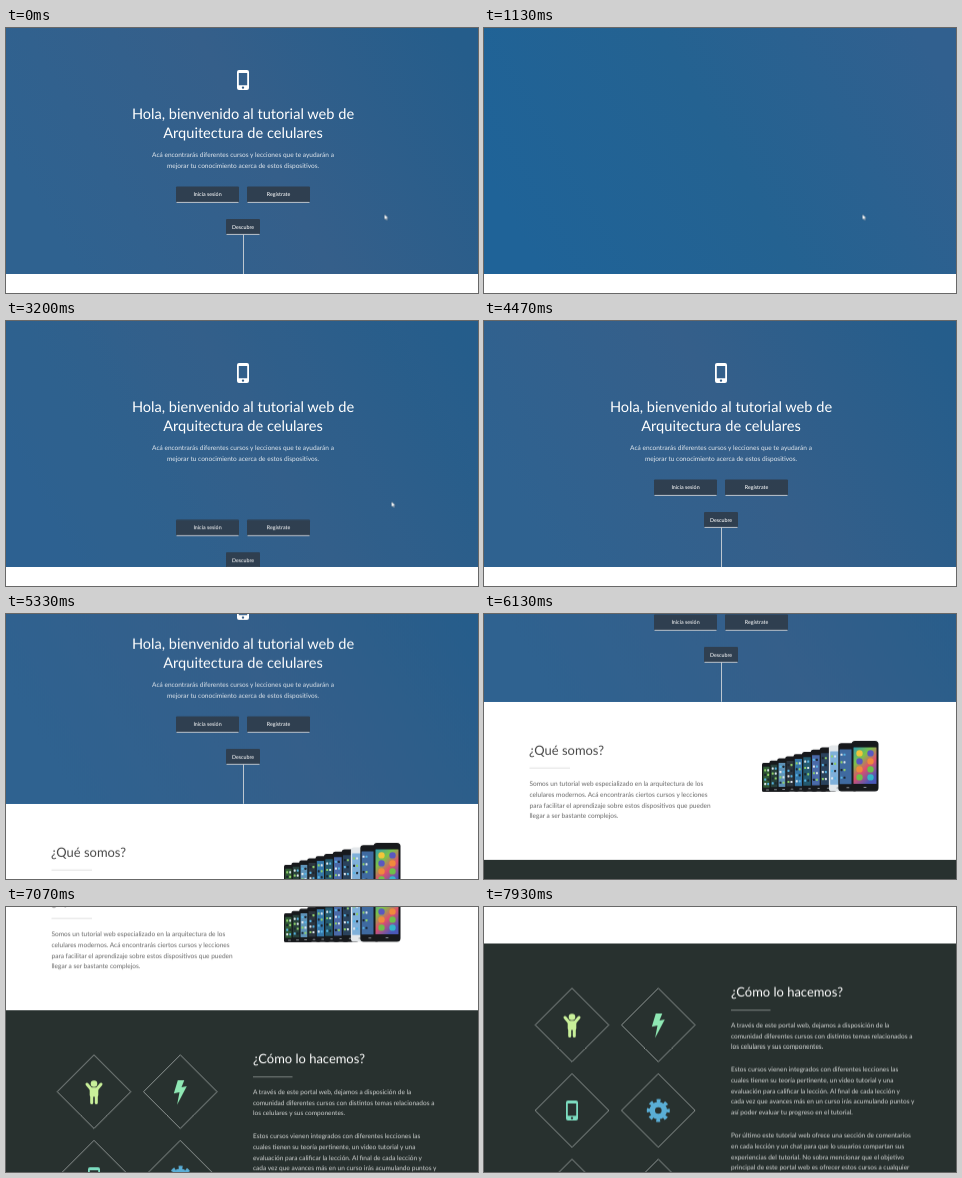
An HTML page that plays this animation: 472x265 px, repeating every 8000 ms.

```html
<!DOCTYPE html>
<html lang="es">
<head>
<meta charset="utf-8">
<title>Arquitectura de celulares</title>
<style>
html, body { margin: 0; width: 100%; height: 100%; overflow: hidden; background: #fff; }
svg { display: block; width: 472px; height: 265px; }
text { font: 6.52px Lato, "Open Sans", sans-serif; white-space: pre; text-rendering: geometricPrecision; }
.mid { text-anchor: middle; fill: #fff; }
.title { font-size: 14.6px; }
.head { font-size: 12.95px; }
.btn { font-size: 5.3px; font-weight: 500; }
.page, .intro, .slide, .shade, .pointer { animation: 8s linear infinite; }

.page { animation-name: scroll; }
@keyframes scroll {
  0%, 63.9% { transform: translateY(0); }
  66.625% { transform: translateY(-56px); }
  76.625% { transform: translateY(-158px); }
  88.375% { transform: translateY(-300.7px); }
  99.125%, 100% { transform: translateY(-367.5px); }
}
.intro { animation-name: intro; }
@keyframes intro {
  0%, 11.62% { opacity: 1; }
  11.63%, 20.875% { opacity: 0; }
  33%, 100% { opacity: 1; }
}
.slide { animation-name: slide; }
@keyframes slide {
  0%, 11.62% { opacity: 1; transform: translateY(0); }
  11.63%, 30% { opacity: 0; transform: translateY(90px); }
  40% { opacity: 1; transform: translateY(40.3px); animation-timing-function: ease-out; }
  53.75%, 100% { opacity: 1; transform: translateY(0); }
}
.shade { animation-name: shade; }
@keyframes shade {
  0%, 11.62% { opacity: 1; }
  11.63%, 20.875% { opacity: 0; animation-timing-function: ease; }
  50%, 100% { opacity: 1; }
}
.pointer { animation-name: pointer; }
@keyframes pointer {
  0%, 36.25% { transform: translate(378.5px, 186.5px); }
  40% { transform: translate(385.5px, 180.7px); animation-timing-function: ease-in-out; }
  57%, 100% { transform: translate(480px, 130px); }
}
</style>
</head>
<body>
<svg viewBox="0 0 472 265">
  <defs>
    <linearGradient id="sky" x1="0" y1="0.6" x2="1" y2="0.3">
      <stop offset="0" stop-color="#1f6398"/>
      <stop offset="0.5" stop-color="#246291"/>
      <stop offset="1" stop-color="#31608f"/>
    </linearGradient>
    <linearGradient id="dusk" x1="0" y1="0.5" x2="1" y2="0.2">
      <stop offset="0" stop-color="#2f6290"/>
      <stop offset="0.5" stop-color="#355f8a"/>
      <stop offset="1" stop-color="#255d8b"/>
    </linearGradient>
    <linearGradient id="rainbow" x1="0" y1="0" x2="0.6" y2="1">
      <stop offset="0" stop-color="#2f9bb0"/>
      <stop offset="0.35" stop-color="#7cc24a"/>
      <stop offset="0.65" stop-color="#e0506c"/>
      <stop offset="1" stop-color="#4a58b8"/>
    </linearGradient>
    <clipPath id="heroClip"><path d="M0 0H472V246H0Z"/></clipPath>
    <path id="mobile" fill-rule="evenodd" d="M-4-10H4Q6-10 6-8V8Q6 10 4 10H-4Q-6 10-6 8V-8Q-6-10-4-10ZM-4.2-7V5.2H4.2V-7ZM-1.2 7.6A1.2 1.2 0 1 0 1.2 7.6A1.2 1.2 0 1 0-1.2 7.6Z"/>
    <g id="child" stroke="#c9f09a" stroke-width="3" stroke-linecap="round" stroke-linejoin="round" fill="#c9f09a">
      <circle cy="-8" r="1.8"/>
      <path d="M-7-7.5L-2.8-2.5H2.8L7-7.5" fill="none"/>
      <path d="M-2.8-2.5H2.8V3.5H-2.8Z"/>
      <path d="M-2.3 3V11M2.3 3V11"/>
    </g>
    <path id="bolt" fill="#8fe8b4" d="M-2.5-11.5H4L1.2-4.5L6.5-5.6L-3.2 13L-.8.4L-6.5 1.8Z"/>
    <g id="cog" fill="none" stroke="#5aaed6">
      <circle r="6" stroke-width="5.4"/>
      <circle r="9.5" stroke-width="4" stroke-dasharray="3.73" stroke-dashoffset="1.87"/>
    </g>
    <use id="cell" href="#mobile" fill="#7cdcc0"/>
  </defs>

  <g class="page">
    <rect y="246" width="472" height="158" fill="#fff"/>
    <g clip-path="url(#heroClip)">
      <rect width="472" height="246" fill="url(#sky)"/>
      <rect class="shade" width="472" height="246" fill="url(#dusk)"/>
      <g class="intro">
        <use href="#mobile" x="237" y="52" fill="#fff"/>
        <text class="mid title"><tspan x="237" y="90.5">Hola, bienvenido al tutorial web de</tspan><tspan x="237" dy="19.7">Arquitectura de celulares</tspan></text>
        <text class="mid" fill-opacity="0.85"><tspan x="237" y="128.9">Acá encontrarás diferentes cursos y lecciones que te ayudarán a</tspan><tspan x="237" dy="10.6">mejorar tu conocimiento acerca de estos dispositivos.</tspan></text>
      </g>
      <g class="slide">
        <g fill="#2f3f50">
          <rect x="170" y="158.5" width="63" height="16" rx="1"/>
          <rect x="241" y="158.5" width="63" height="16" rx="1"/>
          <rect x="220" y="191" width="34" height="15.5" rx="1"/>
        </g>
        <path d="M170.5 174.4H232.5M241.5 174.4H303.5M220.5 206.4H253.5M237.5 206.5V246" stroke="#cdd3d8" stroke-width="0.9"/>
        <text class="mid btn" x="201.5" y="168.4">Inicia sesión</text>
        <text class="mid btn" x="272.5" y="168.4">Regístrate</text>
        <text class="mid btn" x="237" y="200.7">Descubre</text>
      </g>
    </g>

    <text class="head" x="45" y="299.2" fill="#484848">¿Qué somos?</text>
    <path d="M45.5 312.2H86" stroke="#d6d6d6" stroke-width="0.7"/>
    <text fill="#666"><tspan x="45.5" y="330.3">Somos un tutorial web especializado en la arquitectura de los</tspan><tspan x="45.5" dy="10.6">celulares modernos. Acá encontrarás ciertos cursos y lecciones</tspan><tspan x="45.5" dy="10.6">para facilitar el aprendizaje sobre estos dispositivos que pueden</tspan><tspan x="45.5" dy="10.6">llegar a ser bastante complejos.</tspan></text>
    <g id="phones"></g>

    <rect y="404" width="472" height="300" fill="#28312f"/>
    <g id="tiles"></g>
    <text class="head" x="247" y="457.3" fill="#fff">¿Cómo lo hacemos?</text>
    <path d="M247 470.7H286.5" stroke="#a3a8a6" stroke-width="0.7"/>
    <g fill="#d4d7d6">
      <text><tspan x="247" y="487.9">A través de este portal web, dejamos a disposición de la</tspan><tspan x="247" dy="10.6">comunidad diferentes cursos con distintos temas relacionados a</tspan><tspan x="247" dy="10.6">los celulares y sus componentes.</tspan></text>
      <text><tspan x="247" y="532.4">Estos cursos vienen integrados con diferentes lecciones las</tspan><tspan x="247" dy="10.6">cuales tienen su teoría pertinente, un video tutorial y una</tspan><tspan x="247" dy="10.6">evaluación para calificar la lección. Al final de cada lección y</tspan><tspan x="247" dy="10.6">cada vez que avances más en un curso irás acumulando puntos y</tspan><tspan x="247" dy="10.6">así poder evaluar tu progreso en el tutorial.</tspan></text>
      <text><tspan x="247" y="598.4">Por último este tutorial web ofrece una sección de comentarios</tspan><tspan x="247" dy="10.6">en cada lección y un chat para que lo usuarios compartan sus</tspan><tspan x="247" dy="10.6">experiencias del tutorial. No sobra mencionar que el objetivo</tspan><tspan x="247" dy="10.6">principal de este portal web es ofrecer estos cursos a cualquier</tspan></text>
    </g>
  </g>

  <path class="pointer" d="M0 0V5L1.2 4L2 5.7L2.9 5.3L2.2 3.6H3.7Z" fill="#fff" stroke="#1d2a38" stroke-width="0.2"/>
</svg>
<script>
const byId = id => document.getElementById(id);
const rect = (x, y, w, h, r, fill) =>
  `<rect x="${x}" y="${y}" width="${w}" height="${h}" rx="${r}" fill="${fill}"/>`;
const dot = (x, y, r, fill) => `<circle cx="${x}" cy="${y}" r="${r}" fill="${fill}"/>`;

// Row of handsets, growing towards the right
const screens = ['#2f5a35', '#27403a', '#5f93b8', '#2c3640', '#3577a8', '#245a70',
                 '#4a6aa8', '#2a425c', '#7fb0da', '#3f6aa0', 'url(#rainbow)'];
const icons = ['#8fd06a', '#dfe8ee', '#58b4e4', '#1c2730'];
const blobs = ['#f2c53a', '#e8486f', '#35b6c8', '#6fc04a', '#f08a3c', '#5a58c0'];
byId('phones').innerHTML = screens.map((screen, i) => {
  const last = i === 10, k = i / 10;
  const x = last ? 367.5 : 278 + 7.4 * i + 0.12 * i * i;
  const w = last ? 27 : 11 + 9 * k;
  const top = 307 - 22 * k, h = 29 + 21.5 * k;
  const body = i === 8 ? '#e3e7ea' : '#17191c';
  const pad = last ? 2 : 1.3, sy = top + h * 0.13, sh = h * 0.72;
  let art = rect(x, top, w, h, 1.5 + 2 * k, body) + rect(x + pad, sy, w - 2 * pad, sh, 0.3, screen);
  for (let n = 0; n < 8; n++) {
    const row = n >> 1, col = n % 2;
    art += last
      ? dot(x + 8 + 11 * col, sy + sh * (0.16 + 0.22 * row), 3.2, blobs[(n * 5 + row) % 6])
      : rect(x + 2.2 + col * 3, sy + sh * (0.12 + 0.22 * row), 2, 2.2, 0.4, icons[(n + row + i) % 4]);
  }
  return art + rect(x + w / 2 - 1.5, top + h * 0.91, 3, 1, 0.5, '#8a9096');
}).join('');

// Diamond tiles in two columns
byId('tiles').innerHTML = ['child', 'bolt', 'cell', 'cog', '', ''].map((icon, i) => {
  const x = 88 + 86.3 * (i % 2), y = 485.5 + 85.5 * (i >> 1);
  return `<g transform="translate(${x} ${y})">
    <path d="M0-36.8L36.8 0L0 36.8L-36.8 0Z" fill="none" stroke="#bcc2c0" stroke-width="0.7"/>
    ${icon && `<use href="#${icon}"/>`}</g>`;
}).join('');
</script>
</body>
</html>
```
